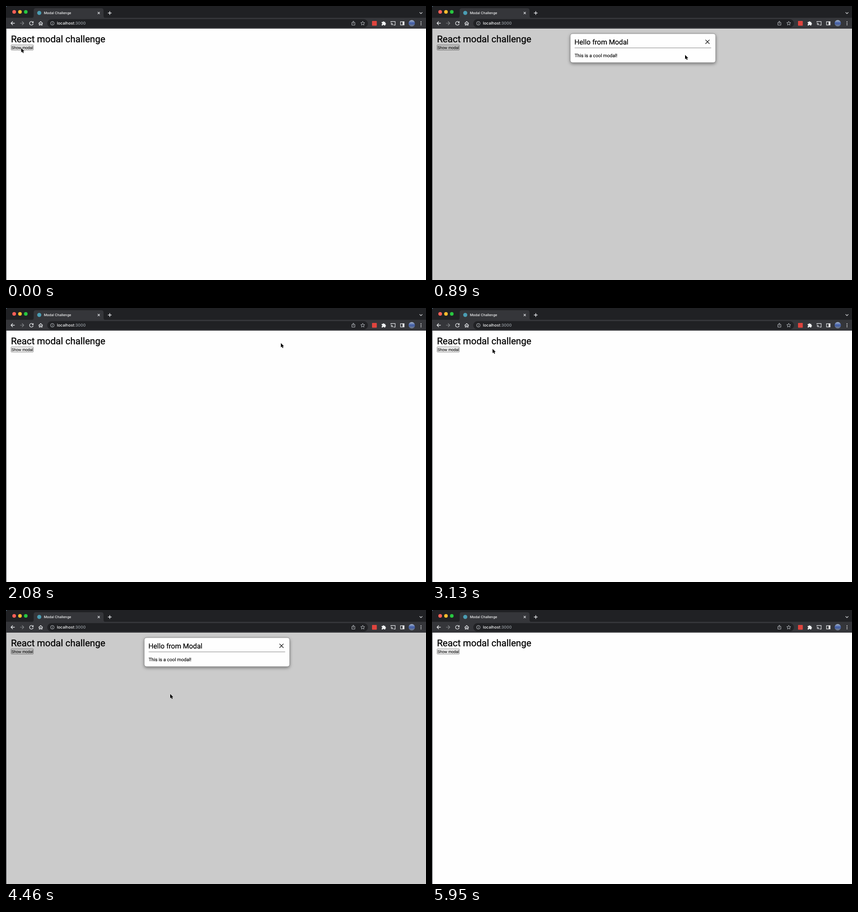
These frames come from a looping animation (926 by 605 pixels, 6.4 s). An HTML page:

```html
<!DOCTYPE html>
<html lang="en">
<head>
<meta charset="utf-8">
<title>Modal Challenge</title>
<style>
  html, body { margin: 0; width: 100%; height: 100%; overflow: hidden; background: #fefefe; }
  svg { display: block; width: 100vw; height: 100vh; }
  text { white-space: pre; text-rendering: geometricPrecision; }
  .page { font-family: Roboto, sans-serif; stroke: #000; stroke-width: .016em; }
  .button { font: 8.57px "Liberation Sans", Arial, sans-serif; stroke: #000; stroke-width: .12px; }
  .ui { font-family: Inter, sans-serif; font-weight: 500; fill: #f4f5f6; }
  .line { fill: none; stroke: #e8eaed; stroke-width: 1.2; }
</style>
</head>
<body>
<svg viewBox="0 0 926 605" xmlns="http://www.w3.org/2000/svg">
  <defs>
    <filter id="shadow" x="-10%" y="-30%" width="120%" height="170%">
      <feDropShadow dx="0" dy="2.5" stdDeviation="3.6" flood-color="#000" flood-opacity=".42"/>
    </filter>
    <linearGradient id="photo" x2="0" y2="1">
      <stop offset="0" stop-color="#a9b8cc"/>
      <stop offset=".5" stop-color="#3f5ca8"/>
      <stop offset="1" stop-color="#77808a"/>
    </linearGradient>
  </defs>

  <rect width="926" height="605" fill="#fefefe"/>

  <!-- Page -->
  <text class="page" x="10.9" y="80" font-size="20.57">React modal challenge</text>
  <rect id="button" x="11.2" y="85.8" width="49" height="11.6" rx="1.2" stroke="#767676" stroke-width=".8"/>
  <text class="button" x="12.1" y="94.7">Show modal</text>

  <!-- Backdrop and modal fade separately, so the page shows through both -->
  <rect id="backdrop" y="50" width="926" height="555" fill="#000" fill-opacity=".2"/>
  <g id="modal">
    <rect x="304.8" y="61" width="320.6" height="64" rx="5" fill="#fefefe" stroke="#777" stroke-width=".8" filter="url(#shadow)"/>
    <text class="page" x="314.1" y="85" font-size="15.43">Hello from Modal</text>
    <path d="M602.9 74.6l8.9 8.9m0-8.9l-8.9 8.9" fill="none" stroke="#000" stroke-width="1.1"/>
    <path d="M314.5 92.5H615.5" stroke="#777" stroke-width=".9"/>
    <text class="page" x="314.4" y="112.6" font-size="10.29">This is a cool modal!</text>
  </g>

  <!-- Browser window -->
  <rect y="50" width="1" height="555" fill="#3b3e42"/>
  <rect width="926" height="26.5" fill="#202124"/>
  <path d="M0 0H4A4 4 0 0 0 0 4Z" fill="#5d7f94"/>
  <rect y="26" width="926" height="24" fill="#35363a"/>
  <path d="M56 26.5q5 0 5-5V10q0-5 5-5H210q5 0 5 5V21.5q0 5 5 5Z" fill="#35363a"/>
  <circle cx="18" cy="13" r="4" fill="#ff5f57"/>
  <circle cx="30.8" cy="13" r="4" fill="#febc2e"/>
  <circle cx="43.6" cy="13" r="4" fill="#28c840"/>
  <circle cx="73.3" cy="15.3" r="4.5" fill="#4b9db3"/>
  <text class="ui" x="83.5" y="18" font-size="7.5">Modal Challenge</text>
  <g class="line">
    <path d="M202.2 13.2l4.6 4.6m0-4.6l-4.6 4.6"/>
    <path d="M228.7 11.5v8m-4-4h8" stroke-width="1.4"/>
    <path d="M911.8 13.8l3.1 3.1 3.1-3.1"/>
  </g>

  <!-- Toolbar -->
  <rect x="91" y="29" width="707" height="18.5" rx="9.25" fill="#202124"/>
  <g class="line">
    <path d="M19.3 38H11m4-4l-4 4 4 4" stroke-width="1.3"/>
    <path d="M31 38h8.3m-4-4l4 4-4 4" stroke="#85878a"/>
    <path d="M59.2 35.8A4 4 0 1 0 59.9 39M60 33.7v3.1h-3.1" stroke-width="1.3"/>
    <path d="M71.9 38.5l4.6-4.3 4.6 4.3M73.3 37.5v4.7h2.1v-3h2.2v3h2.1v-4.7"/>
    <g stroke="#bdc1c6" stroke-width="1">
      <circle cx="102.2" cy="38.2" r="4"/>
      <path d="M102.2 37.5v3m0-4.8v.9"/>
      <path d="M764.5 36.5h-1.9v5.7h6.6v-5.7h-1.9M765.9 39.5v-6m-2 1.9l2-2 2 2"/>
      <path id="star"/>
    </g>
    <path d="M848.6 36v-1.7h9.4v7.9h-3.3M848.6 37.8a4.4 4.4 0 0 1 4.4 4.4m-4.4-2.3a2.3 2.3 0 0 1 2.3 2.3"/>
    <path d="M869.8 34.6h8v7.3h-8z"/>
  </g>
  <text class="ui" x="112.2" y="41.3" font-size="8.8">localhost<tspan fill="#9aa0a6">:3000</tspan></text>
  <rect x="807" y="33" width="10.5" height="10.5" rx="1" fill="#e0443e"/>
  <g fill="#f1f3f4">
    <path d="M828.3 35.2h2.5a1.5 1.5 0 0 1 3 0h2.5v2.5a1.5 1.5 0 0 1 0 3v2.2h-2.5a1.5 1.5 0 0 0-3 0h-2.5v-2.5a1.3 1.3 0 0 0 0-2.7z"/>
    <path d="M874.4 34.6h3.4v7.3h-3.4z"/>
    <circle cx="915" cy="34.8" r="1"/>
    <circle cx="915" cy="38.2" r="1"/>
    <circle cx="915" cy="41.6" r="1"/>
  </g>
  <circle cx="894.6" cy="38" r="7" fill="url(#photo)"/>

  <path id="cursor" d="M0 0V9.5L2.2 7.5 3.8 11 5.5 10.2 4 6.9H6.9Z" fill="#000" stroke="#fff" stroke-width=".8" stroke-linejoin="round" paint-order="stroke"/>
</svg>
<script>
  const LOOP = 6400, STEPS = 43, FADE = 2;
  const get = id => document.getElementById(id);
  const button = get("button"), backdrop = get("backdrop"), modal = get("modal"), cursor = get("cursor");

  const clamp = v => Math.min(1, Math.max(0, v));
  const ease = k => k * k * (3 - 2 * k);

  const home = { x: 33.5, y: 93 };
  const moves = [
    { from: 1, to: 6, x: 558, y: 108 },
    { from: 6, to: 9, x: 606, y: 77.5 },
    { from: 15, to: 23, x: 46, y: 92.5 },
    { from: 24, to: 30, x: 362, y: 185.5 },
    { from: 36, to: 40, x: 640, y: 640 }
  ];
  const openings = [{ open: 0, close: 12 }, { open: 22.2, close: 34 }];

  function cursorAt(step) {
    return moves.reduce((p, m) => {
      const k = ease(clamp((step - m.from) / (m.to - m.from)));
      return { x: p.x + (m.x - p.x) * k, y: p.y + (m.y - p.y) * k };
    }, home);
  }

  function opacityAt(step) {
    return Math.max(...openings.map(o => clamp(Math.min(step - o.open, o.close + FADE - step) / FADE)));
  }

  function starPath(cx, cy, outer, inner) {
    const points = Array.from({ length: 10 }, (_, i) => {
      const r = i % 2 ? inner : outer, a = i * Math.PI / 5 - Math.PI / 2;
      return (cx + r * Math.cos(a)).toFixed(2) + " " + (cy + r * Math.sin(a)).toFixed(2);
    });
    return "M" + points.join("L") + "Z";
  }

  function draw(time) {
    // The picture advances in even steps, with a small rounding allowance.
    const step = Math.floor((time % LOOP + 6) * STEPS / LOOP) % STEPS;
    const { x, y } = cursorAt(step);
    const opacity = opacityAt(step);
    const hover = opacity === 0 && x > 11 && x < 60 && y > 85 && y < 98;
    cursor.setAttribute("transform", `translate(${x} ${y})`);
    backdrop.setAttribute("opacity", opacity);
    modal.setAttribute("opacity", opacity);
    button.setAttribute("fill", hover ? "#e5e5e5" : "#efefef");
  }

  get("star").setAttribute("d", starPath(786.5, 38.4, 4.7, 2.1));
  const start = performance.now();
  function tick() {
    draw(performance.now() - start);
    requestAnimationFrame(tick);
  }
  draw(0);
  requestAnimationFrame(tick);
</script>
</body>
</html>
```
